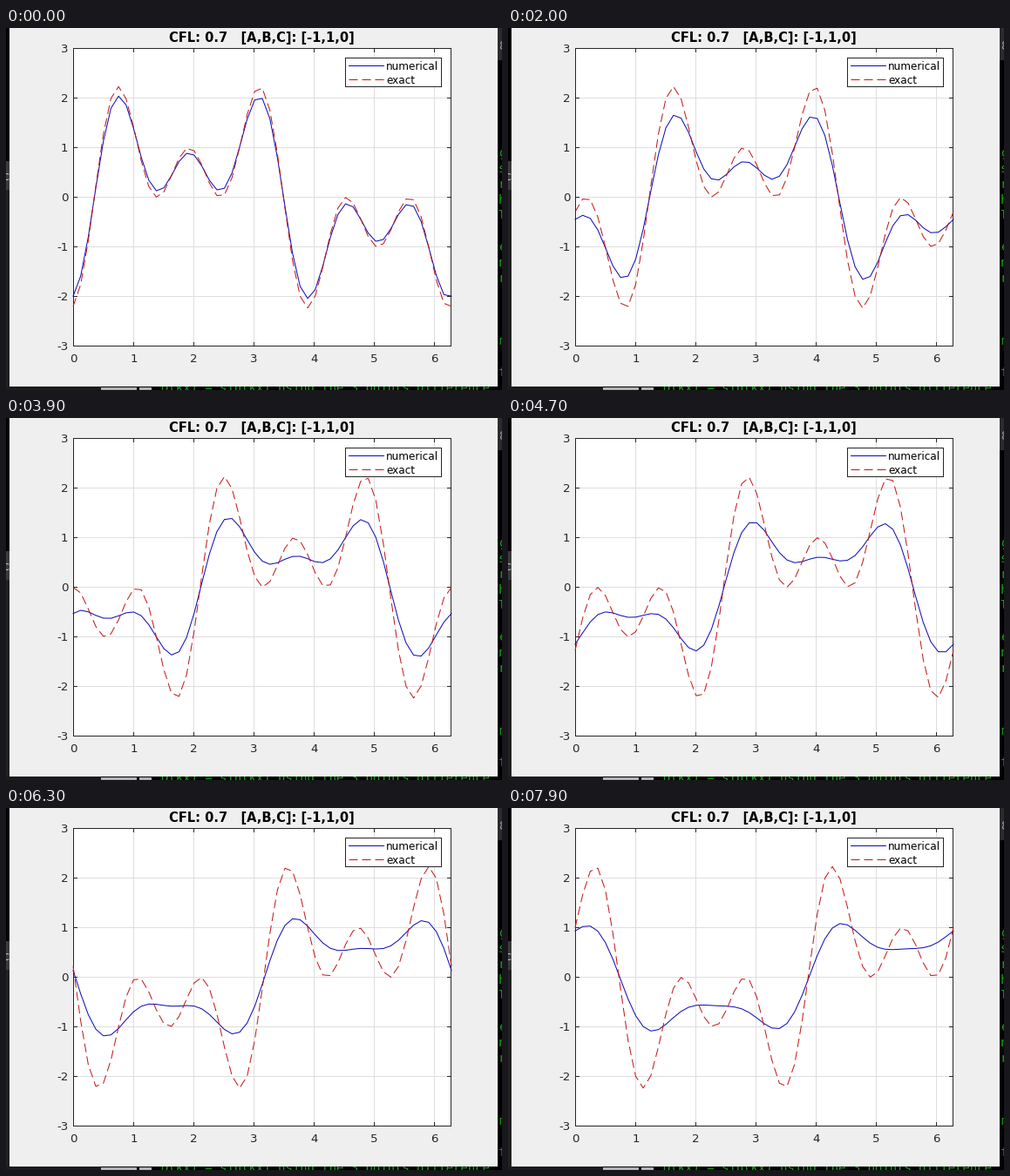
Write a matplotlib script that moves like this. It is 569x416 px and loops after 8000 ms.

```python
import numpy as np
import matplotlib.pyplot as plt
from matplotlib.animation import FuncAnimation
from matplotlib.patches import Rectangle

# Upwind advection of three sine modes on a periodic grid
CELLS, CFL, LEAD = 50, 0.7, 4
TICK_MS, FRAMES = 100, 80
# Ticks at which the screen refreshes; the solver advances one step per two ticks
REFRESH = [0, 4, 8, 10, 12, 14, 18, 20, 22, 23, 27, 29, 32, 34, 37, 39,
           41, 43, 47, 49, 51, 54, 57, 59, 61, 63, 67, 70, 72, 74, 77, 79]

W, H, DPI = 569, 416, 64
PX = 72 / DPI
LEFT, TOP, BOX_W, BOX_H = 77, 23.4, 434, 342.3
BLUE, RED, INK, GREEN = "#0808b8", "#c41414", "#262626", "#12a812"

dx = 2 * np.pi / CELLS
grid = np.arange(CELLS + 1) * dx


def profile(x):
    return np.sin(x) + np.sin(3 * x) + np.sin(5 * x)


def solve(steps):
    u = profile(grid[:-1])
    out = [u]
    for _ in range(steps):
        u = u - CFL * (u - np.roll(u, 1))
        out.append(u)
    return [np.append(v, v[0]) for v in out]


def sx(x):
    return LEFT + BOX_W * np.asarray(x) / (2 * np.pi)


def sy(y):
    return TOP + BOX_H * (3 - np.asarray(y)) / 6


fig = plt.figure(figsize=(W / DPI, H / DPI), dpi=DPI, facecolor="black")
ax = fig.add_axes([0, 0, 1, 1])
ax.set_xlim(0, W)
ax.set_ylim(H, 0)
ax.axis("off")


def rect(x0, y0, x1, y1, color, z=0):
    ax.add_patch(Rectangle((x0, y0), x1 - x0, y1 - y0, fc=color, ec="none",
                           snap=False, zorder=z))


def seg(x0, y0, x1, y1, color=INK, z=3, **kw):
    """One-pixel line through whole pixels."""
    ax.plot(np.array([x0, x1]) + 0.5, np.array([y0, y1]) + 0.5, color=color,
            lw=PX, snap=False, zorder=z, **kw)


def frame_box(x0, y0, x1, y1, z):
    for a, b, c, d in ((x0, y0, x1, y0), (x0, y1, x1, y1),
                       (x0, y0, x0, y1), (x1, y0, x1, y1)):
        seg(a, b, c, d, z=z)


def label(x, y, s, size, color=INK, ha="left", va="baseline", z=3, **kw):
    ax.text(x, y, s, fontsize=size * PX, color=color, ha=ha, va=va,
            zorder=z, **{"family": "DejaVu Sans", **kw})


def draw_desktop():
    rect(0, 153, 4, 186, "#3a3a3a")
    rect(0, 186, 4, H, "#202020")
    rect(564, 0, W, 37, "#2a2b2e")
    mono = dict(family="DejaVu Sans Mono", z=0.5, clip_on=True)
    label(565, 25, "8", 14, "#9a9a9a", **mono)
    label(-4, 175, "c", 14, "#c0c0c0", **mono)
    for row, ch in enumerate("gsrhl enr   m f"):
        label(565, 148 + 18 * row, ch, 14, GREEN, **mono)
    label(178, 418, "D(kx) = sin(kx) using the 3 points difference", 14,
          GREEN, **mono)
    rect(0, 412, 109, H, "#1c1c1c")
    rect(109, 413, 150, H, "#b4b4b4")
    rect(153, 413, 167, H, "#b4b4b4")
    rect(4, 0, 564, 412, "#efefef", z=1)


def draw_axes():
    x0, y0, x1, y1 = 77, 23, 510, 365
    rect(x0, y0, x1 + 1, y1 + 1, "white", z=1.5)
    for k in range(7):
        x = int(sx(k))
        seg(x, y0, x, y1, "#dedede", z=2)
        seg(x, y1, x, y1 - 4)
        seg(x, y0, x, y0 + 4)
        label(x + 0.5, 384.5, str(k), 13.33, ha="center")
    for k in range(-3, 4):
        y = int(sy(k))
        seg(x0, y, x1, y, "#dedede", z=2)
        seg(x0, y, x0 + 4, y)
        seg(x1, y, x1 - 4, y)
        label(71.5, y + 5.2, str(k), 13.33, ha="right")
    frame_box(x0, y0, x1, y1, z=3)
    label(293.7, 16, "CFL: 0.7   [A,B,C]: [-1,1,0]", 14.6, "black",
          ha="center", weight="bold")


def draw_legend():
    rect(389, 34, 500, 68, "white", z=6)
    frame_box(389, 34, 499, 67, z=7)
    seg(393, 43, 433, 43, BLUE, z=7)
    seg(393, 59, 433, 59, RED, z=7, dashes=(10, 5))
    label(436, 48, "numerical", 12, "black", z=7)
    label(436, 64, "exact", 12, "black", z=7)


draw_desktop()
draw_axes()
draw_legend()
numerical, = ax.plot([], [], color=BLUE, lw=PX, zorder=4)
exact, = ax.plot([], [], color=RED, lw=PX, dashes=(10, 5), zorder=5)

history = solve(LEAD + (REFRESH[-1] + 1) // 2)


def update(tick):
    shown = max(t for t in REFRESH if t <= tick)
    step = LEAD + (shown + 1) // 2
    numerical.set_data(sx(grid), sy(history[step]))
    exact.set_data(sx(grid), sy(profile(grid - step * CFL * dx)))
    return numerical, exact


anim = FuncAnimation(fig, update, frames=FRAMES, interval=TICK_MS,
                     init_func=lambda: update(0), repeat=True,
                     repeat_delay=0)
plt.show()
```
